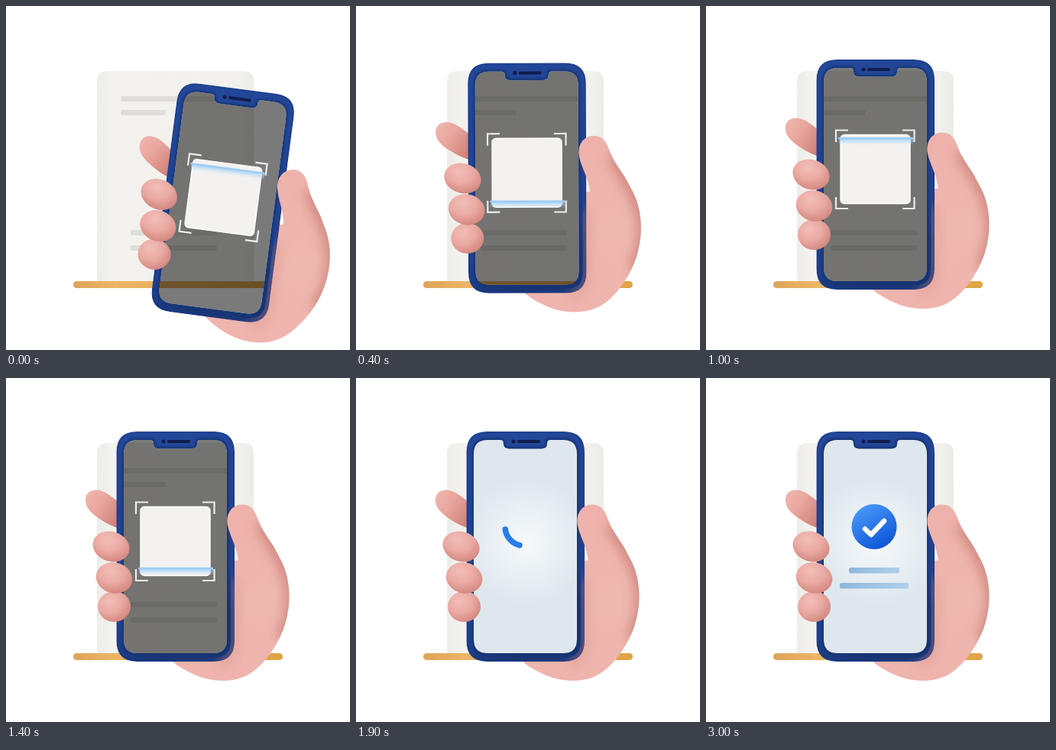
An HTML page for the animation above (3500 ms loop, 450x450 px).

```html
<!DOCTYPE html>
<html lang="en">
<head>
<meta charset="utf-8">
<title>Scan and confirm</title>
<style>
html, body { margin: 0; width: 100%; height: 100%; overflow: hidden; background: #fff; }
svg { display: block; width: 100vw; height: 100vh; }
</style>
</head>
<body>
<svg viewBox="0 0 450 450">
  <defs>
    <linearGradient id="paper">
      <stop offset="0" stop-color="#ecece9"/>
      <stop offset=".09" stop-color="#f3f2ef"/>
      <stop offset=".9" stop-color="#f2f1ed"/>
      <stop offset="1" stop-color="#ecebe7"/>
    </linearGradient>
    <linearGradient id="desk">
      <stop offset="0" stop-color="#dda459"/>
      <stop offset=".2" stop-color="#ebb565"/>
      <stop offset="1" stop-color="#e0a444"/>
    </linearGradient>
    <linearGradient id="case" x2=".3" y2="1">
      <stop offset="0" stop-color="#24489a"/>
      <stop offset=".8" stop-color="#204190"/>
      <stop offset="1" stop-color="#193576"/>
    </linearGradient>
    <linearGradient id="skin" gradientUnits="userSpaceOnUse" x1="300" y1="180" x2="320" y2="400">
      <stop offset="0" stop-color="#eeb2ab"/>
      <stop offset=".5" stop-color="#efb8b0"/>
      <stop offset="1" stop-color="#efb4ad"/>
    </linearGradient>
    <radialGradient id="tip" cx=".36" cy=".32" r=".74">
      <stop offset="0" stop-color="#f2beb7"/>
      <stop offset=".5" stop-color="#eaaba4"/>
      <stop offset="1" stop-color="#d2857d"/>
    </radialGradient>
    <linearGradient id="index" x2="1" y2=".8">
      <stop offset="0" stop-color="#f0b8b0"/>
      <stop offset=".45" stop-color="#e8a69e"/>
      <stop offset="1" stop-color="#cf8078"/>
    </linearGradient>
    <radialGradient id="glow" gradientUnits="userSpaceOnUse" cx="222" cy="214" r="84">
      <stop offset="0" stop-color="#f6f9fb"/>
      <stop offset=".45" stop-color="#ebf1f5"/>
      <stop offset="1" stop-color="#dee7ed"/>
    </radialGradient>
    <linearGradient id="badge" x1=".2" x2=".8" y2="1">
      <stop offset="0" stop-color="#4a9bfa"/>
      <stop offset="1" stop-color="#0b50d6"/>
    </linearGradient>
    <linearGradient id="bar">
      <stop offset="0" stop-color="#8fb8dc"/>
      <stop offset="1" stop-color="#b0cfe9"/>
    </linearGradient>
    <linearGradient id="beam" x2="0" y2="1">
      <stop offset="0" stop-color="#8fc6f5" stop-opacity=".85"/>
      <stop offset="1" stop-color="#b5dcf8" stop-opacity="0"/>
    </linearGradient>
    <filter id="soft" x="-40%" y="-40%" width="180%" height="180%"><feGaussianBlur stdDeviation="8"/></filter>
    <filter id="edge"><feGaussianBlur stdDeviation="1.3"/></filter>
    <path id="palm" d="M294 240 L306 238 L326 180 C334 198 349 217 359 237 C372 261 374 293 365 322 C356 352 331 385 308 392 C290 399 262 397 240 385 C229 379 221 375 214 366 L270 366 Q294 366 294 345 Z"/>
    <path id="thumb" d="M304 239 C302 220 293 208 290 193 C287 177 296 165.500 309 165.500 C321 165.500 326 174 330 186 C336 203 349 216 353 226 L330 262 Z"/>
    <path id="display" d="M172 81 H189 Q193 81 193 86 Q193 92.500 201 92.500 H242 Q250 92.500 250 86 Q250 81 254 81 H271 Q289 81 289 99 V342 Q289 360 271 360 H172 Q154 360 154 342 V99 Q154 81 172 81 Z"/>
    <path id="outline" d="M171.500 70 H272 Q299 70 299 97 V344 Q299 371 272 371 H171.500 Q144.500 371 144.500 344 V97 Q144.500 70 171.500 70 Z"/>
    <mask id="frame">
      <use href="#outline" fill="#fff"/>
      <use href="#display" fill="#000"/>
    </mask>
    <clipPath id="handClip"><use href="#palm"/><use href="#thumb"/></clipPath>
  </defs>

  <rect width="450" height="450" fill="#fff"/>
  <path d="M119 362 V99 Q119 85 133 85 H310 Q324 85 324 99 V362 Z" fill="url(#paper)"/>
  <g fill="#dfded9">
    <rect x="150" y="118" width="140" height="7" rx="2"/>
    <rect x="150" y="136" width="59" height="7" rx="2"/>
    <rect x="163" y="293" width="113" height="7" rx="2"/>
    <rect x="163" y="313" width="113" height="7" rx="2"/>
  </g>
  <rect x="88" y="360" width="274" height="9" rx="4.500" fill="url(#desk)"/>

  <g id="hand">
    <use href="#palm" fill="url(#skin)"/>
    <g id="index-finger">
      <path d="M148 163 C138 155 129 147 119 146.500 C108 146 103 153 104 162 C105 171 113 178 122 184 C131 190 139 194 148 197 Z" fill="url(#index)"/>
    </g>

    <use href="#display" fill="#000" opacity=".52"/>
    <g id="scan">
      <rect x="176" y="168.500" width="91" height="90" rx="5" fill="#f3f2f0" stroke="#fff" stroke-width="1.400"/>
      <path d="M170 178 V162.500 H186 M257 162.500 H272.500 V178 M272.500 250 V265 H257 M186 265 H170 V250" fill="none" stroke="#ecedec" stroke-width="2.200"/>
      <g id="line">
        <rect x="174" width="97" height="9" fill="url(#beam)"/>
        <rect x="173" y="-1.200" width="98" height="2.400" rx="1.200" fill="#9ccdf6"/>
      </g>
    </g>
    <g id="app">
      <use href="#display" fill="url(#glow)"/>
      <path id="arc" fill="none" stroke="#2a7ce9" stroke-width="7.500" stroke-linecap="round"/>
      <g id="done">
        <circle r="29.500" fill="url(#badge)"/>
        <path d="M-12 3 L-4 10.500 L13 -7.500" fill="none" stroke="#f7fbff" stroke-width="6.500" stroke-linecap="round" stroke-linejoin="round"/>
      </g>
      <rect id="bar1" x="187" y="248" width="66" height="7.500" rx="2" fill="url(#bar)"/>
      <rect id="bar2" x="175" y="268" width="90" height="7.500" rx="2" fill="url(#bar)"/>
    </g>

    <g mask="url(#frame)">
      <use href="#outline" fill="url(#case)"/>
      <g fill="none" filter="url(#edge)">
        <use href="#display" stroke="#15306f" stroke-width="5" opacity=".75"/>
        <use href="#outline" stroke="#1a3a86" stroke-width="2"/>
      </g>
    </g>
    <circle cx="206" cy="83" r="2.600" fill="#101d4c"/>
    <rect x="211" y="81" width="30" height="4" rx="2" fill="#101d4c"/>

    <use href="#thumb" fill="url(#skin)"/>
    <g clip-path="url(#handClip)" fill="none">
      <g filter="url(#soft)">
        <path d="M334 190 C352 225 376 250 374 295 C373 315 368 328 360 342" stroke="#bd6c64" stroke-width="15" opacity=".72"/>
        <path d="M299 262 V340 Q299 368 278 375" stroke="#d58c84" stroke-width="10" opacity=".55"/>
      </g>
    </g>
    <g id="tips" fill="url(#tip)">
      <ellipse cx="141.500" cy="299" rx="21.500" ry="20"/>
      <ellipse cx="141.500" cy="261.500" rx="24" ry="20" transform="rotate(14 141.500 261.500)"/>
      <ellipse cx="137.500" cy="220.500" rx="24.500" ry="19.500" transform="rotate(18 137.500 220.500)"/>
    </g>
  </g>
</svg>
<script>
const $ = id => document.getElementById(id);
const LOOP = 3500, STEP = 100, LAST = 3000;
const CX = 222, CY = 220.5;
const clamp = v => Math.max(0, Math.min(1, v));
const span = (t, a, b) => clamp((t - a) / (b - a));
const smooth = p => p * p * (3 - 2 * p);
const easeOut = p => 1 - (1 - p) ** 3;
const set = (id, name, value) => $(id).setAttribute(name, value);

// Piecewise linear track of [time, value] pairs
function track(t, keys) {
  let i = 1;
  while (i < keys.length - 1 && t > keys[i][0]) i++;
  const [a, u] = keys[i - 1], [b, v] = keys[i];
  return u + (v - u) * span(t, a, b);
}

const beamKeys = [[0, 175], [200, 213], [400, 251], [600, 234], [1000, 173], [1400, 249], [1500, 257]];

// The hand swings in, overshoots a little, then settles
function moveHand(t) {
  const left = 1 - span(t, 0, 600);
  const over = smooth(span(t, 200, 600)) * (1 - smooth(span(t, 600, 1000)));
  const x = 62 * left ** 3 - 0.3 * over;
  const y = 37 * left ** 1.7 - 2.2 * over;
  const r = 7.5 * left ** 3 - 0.9 * over;
  set("hand", "transform", `translate(${x} ${y}) rotate(${r} ${CX} ${CY})`);
  const curl = `rotate(${-3 * over} 138 225)`;
  set("tips", "transform", curl);
  set("index-finger", "transform", curl);
}

function moveSpinner(t) {
  const spin = (t - 1900) / 800 * 360;
  const point = deg => {
    const a = (deg + spin) * Math.PI / 180;
    return `${220 + 25 * Math.cos(a)} ${194.5 + 25 * Math.sin(a)}`;
  };
  set("arc", "d", `M${point(172)} A25 25 0 0 0 ${point(104)}`);
  set("arc", "opacity", span(t, 1600, 1800) * (1 - span(t, 2300, 2400)));
}

function growBar(id, p, mid) {
  set(id, "opacity", p);
  set(id, "transform", `translate(${mid * (1 - p)} 0) scale(${p} 1)`);
}

function draw(t) {
  moveHand(t);
  set("line", "transform", `translate(0 ${track(t, beamKeys)})`);
  set("scan", "opacity", 1 - span(t, 1500, 1700));
  set("app", "opacity", span(t, 1500, 1700));
  moveSpinner(t);
  const pop = easeOut(span(t, 2300, 2600));
  set("done", "transform", `translate(220 194.5) scale(${pop})`);
  set("done", "opacity", pop);
  growBar("bar1", easeOut(span(t, 2500, 2800)), 220);
  growBar("bar2", easeOut(span(t, 2600, 2900)), 220);
}

const start = performance.now();
function tick() {
  const t = (performance.now() - start) % LOOP;
  draw(Math.min(LAST, Math.floor(t / STEP) * STEP));
  requestAnimationFrame(tick);
}
tick();
</script>
</body>
</html>
```
